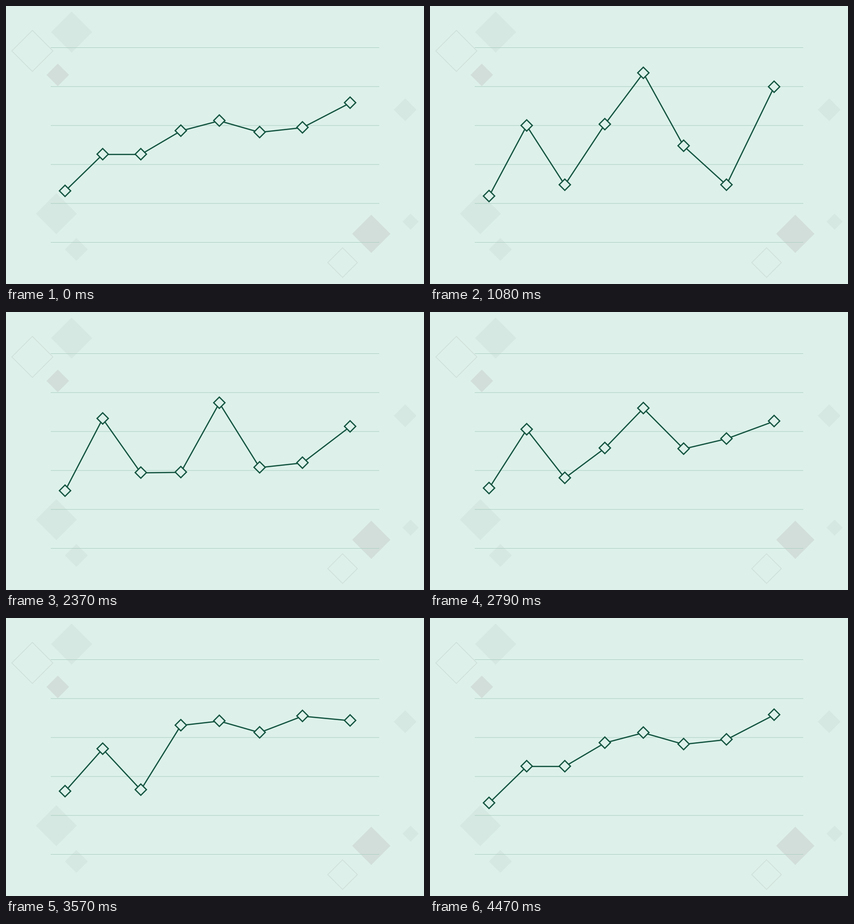
Write a matplotlib script that moves like this. It is 888x591 px and loops after 4530 ms.

```python
import numpy as np
import matplotlib.pyplot as plt
from matplotlib.animation import FuncAnimation
from matplotlib.patches import Polygon

W, H, DPI = 888, 591, 100
STEP, LOOP = 30, 4530
PX = 72 / DPI  # points per pixel

BG = "#ddf1ea"
INK = "#12533f"
GRID = "#a9cec1"
PALE = "#d5e8e1"
GREY = "#d2deda"
RIM = "#cfe0d9"

# One row per marker: x, then its y in each of the four poses
POINTS = np.array([
    (125.4, 393, 404, 380, 367.5),
    (205.4, 315, 254, 225.5, 277),
    (286.4, 315, 380, 341, 366),
    (371.4, 265, 251, 342, 227),
    (453.2, 243.5, 142, 192.5, 218),
    (538.8, 268, 297, 331.5, 242.5),
    (629.8, 258, 380, 322, 207),
    (731.0, 205.5, 171.5, 243.5, 218),
])
XS, POSES = POINTS[:, 0], POINTS[:, 1:].T
TIMES = [0, 1022, 2214, 3396, LOOP - STEP]
RADIUS = 12
LINE_DROP = 0.6  # the line sits slightly below the marker centres


def ease(u, pull=0.68):
    """Symmetric Bezier ease: slow ends, quick middle."""
    s = np.linspace(0, 1, 400)
    x = 3 * s * (1 - s) * (pull * (1 - s) + (1 - pull) * s) + s ** 3
    return np.interp(u, x, s * s * (3 - 2 * s))


def pose(t):
    """Marker heights at time t in ms."""
    k = min(np.searchsorted(TIMES, t, side="right"), len(POSES)) - 1
    p = ease((t - TIMES[k]) / (TIMES[k + 1] - TIMES[k]))
    start, end = POSES[k], POSES[(k + 1) % len(POSES)]
    return start + (end - start) * p


def diamond(x, y, r):
    return [(x, y - r), (x + r, y), (x, y + r), (x - r, y)]


fig = plt.figure(figsize=(W / DPI, H / DPI), dpi=DPI, facecolor=BG)
ax = fig.add_axes([0, 0, 1, 1])
ax.set_xlim(0, W)
ax.set_ylim(H, 0)
ax.axis("off")


def add_diamond(x, y, r, fill="none", edge="none", width=0.0, z=1):
    patch = Polygon(diamond(x, y, r), closed=True, facecolor=fill, edgecolor=edge,
                    linewidth=width * PX, joinstyle="miter", zorder=z)
    return ax.add_patch(patch)


# Background ornaments
for x, y in [(139.5, 55.5), (107, 441.5)]:
    add_diamond(x, y, 43.5, PALE)
for x, y in [(149.5, 517.5), (848, 220.5)]:
    add_diamond(x, y, 24.2, PALE)
add_diamond(859.5, 458.5, 17, PALE)
add_diamond(110, 146.5, 24, GREY)
add_diamond(776, 484.3, 40.7, GREY)
add_diamond(56, 95.5, 43.7, edge=RIM, width=1.6)
add_diamond(715, 545.5, 31.5, edge=RIM, width=1.6)

for y in np.linspace(88.5, 502.5, 6):
    ax.plot([95, 793], [y, y], color=GRID, lw=PX, solid_capstyle="butt",
            snap=False, zorder=2)

line, = ax.plot(XS, pose(0) + LINE_DROP, color=INK, lw=2.6 * PX,
                solid_joinstyle="miter", zorder=3)
markers = [add_diamond(x, y, RADIUS, BG, INK, 2.6, z=4) for x, y in zip(XS, pose(0))]


def update(n):
    ys = pose(n * STEP)
    line.set_ydata(ys + LINE_DROP)
    for marker, x, y in zip(markers, XS, ys):
        marker.set_xy(diamond(x, y, RADIUS))
    return [line, *markers]


anim = FuncAnimation(fig, update, frames=LOOP // STEP, interval=STEP,
                     repeat=True, repeat_delay=0, blit=False)
plt.show()
```
